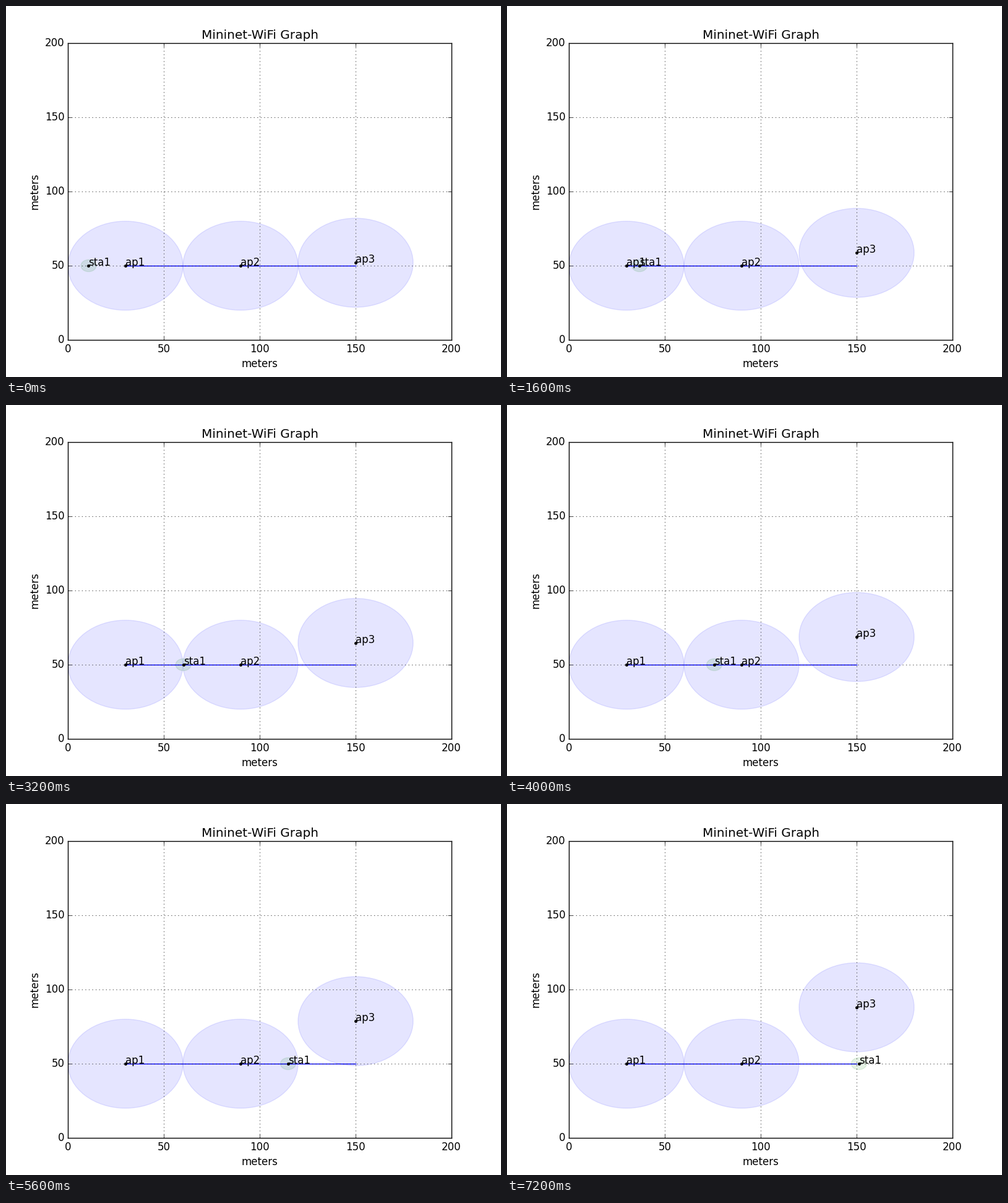
Write a matplotlib script that moves like this. It is 800x600 px and loops after 8000 ms.

```python
import matplotlib.pyplot as plt
from matplotlib.animation import FuncAnimation
from matplotlib.patches import Circle

plt.style.use("classic")
plt.rcParams.update({
    "font.family": "DejaVu Sans",
    "figure.dpi": 100,
    "savefig.dpi": 100,
    "figure.facecolor": "white",
    "savefig.facecolor": "white",
})

# Mobility ticks at which the plot is refreshed, 800 ms apart
TICKS = [3, 8, 13, 18, 22, 28, 39, 43, 47, 57]
INTERVAL = 800

fig = plt.figure(figsize=(8, 6), dpi=100)
ax = fig.add_subplot(111)
ax.set_xlim(0, 200)
ax.set_ylim(0, 200)
ax.set_xticks(range(0, 201, 50))
ax.set_yticks(range(0, 201, 50))
ax.set_title("Mininet-WiFi Graph")
ax.set_xlabel("meters")
ax.set_ylabel("meters")
ax.grid(True)


class Node:
    """A dot with a name and a coverage circle."""

    def __init__(self, name, x, y, reach, color):
        self.area = ax.add_patch(Circle((x, y), reach, color=color, alpha=0.1))
        self.dot, = ax.plot([x], [y], "k.")
        self.label = ax.text(x, y, name)

    def move(self, x, y):
        self.area.center = (x, y)
        self.dot.set_data([x], [y])
        self.label.set_position((x, y))


def sta_pos(tick):
    return 3 + 2.6 * tick, 50


def ap3_pos(tick):
    return 150, 50 + tick * 40 / 60


# Wired links stay where the access points started
for x0, x1 in [(30, 90), (90, 150)]:
    ax.plot([x0, x1], [50, 50], "b")

ap1 = Node("ap1", 30, 50, 30, "b")
ap2 = Node("ap2", 90, 50, 30, "b")
ap3 = Node("ap3", *ap3_pos(TICKS[0]), 30, "b")
sta1 = Node("sta1", *sta_pos(TICKS[0]), 4, "g")


def update(i):
    tick = TICKS[i]
    sta1.move(*sta_pos(tick))
    ap3.move(*ap3_pos(tick))
    return []


anim = FuncAnimation(fig, update, frames=len(TICKS), interval=INTERVAL,
                     repeat=True, repeat_delay=0, blit=False)
plt.show()
```
